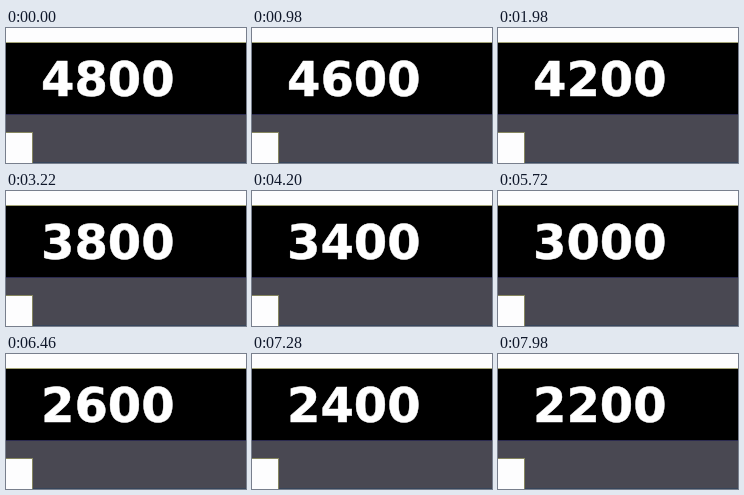
Write an HTML page that moves like this. It is 240 px wide and 135 px high and loops after 8000 ms.

```html
<!DOCTYPE html>
<html lang="en">
<head>
<meta charset="utf-8">
<title>Countdown</title>
<style>
  html, body { margin: 0; width: 100%; height: 100%; overflow: hidden; background: #fff; }
  svg { display: block; width: 100vw; height: 100vh; }
  text {
    font: bold 48px "DejaVu Sans", Verdana, sans-serif;
    fill: #fff; stroke: #fff; stroke-width: .5px;
    filter: blur(.65px);
  }
</style>
</head>
<body>
<svg viewBox="0 0 240 135">
  <rect width="240" height="135" fill="#fdfdfe"/>
  <rect y="14" width="240" height="1" fill="#a5a578"/>
  <rect y="15" width="240" height="71" fill="#000"/>
  <rect y="86" width="240" height="49" fill="#494852"/>
  <rect y="86" width="240" height="1" fill="#2b2a50"/>
  <rect y="134" width="240" height="1" fill="#37455a"/>
  <rect y="104" width="27" height="31" fill="#86865f"/>
  <rect y="105" width="26" height="30" fill="#fdfdfe"/>
  <text id="counter" x="35" y="67.7">4800</text>
</svg>
<script>
  const LOOP = 8000, START = 4800, DROP = 200;
  const FIRST_DROP = 637, INTERVAL = 567;
  const counter = document.getElementById('counter');

  function valueAt(time) {
    const drops = Math.max(0, Math.floor((time - FIRST_DROP) / INTERVAL) + 1);
    return String(START - DROP * drops);
  }

  const origin = performance.now();
  function draw(now) {
    const value = valueAt(Math.max(0, now - origin) % LOOP);
    if (counter.textContent !== value) counter.textContent = value;
    requestAnimationFrame(draw);
  }
  requestAnimationFrame(draw);
</script>
</body>
</html>
```
